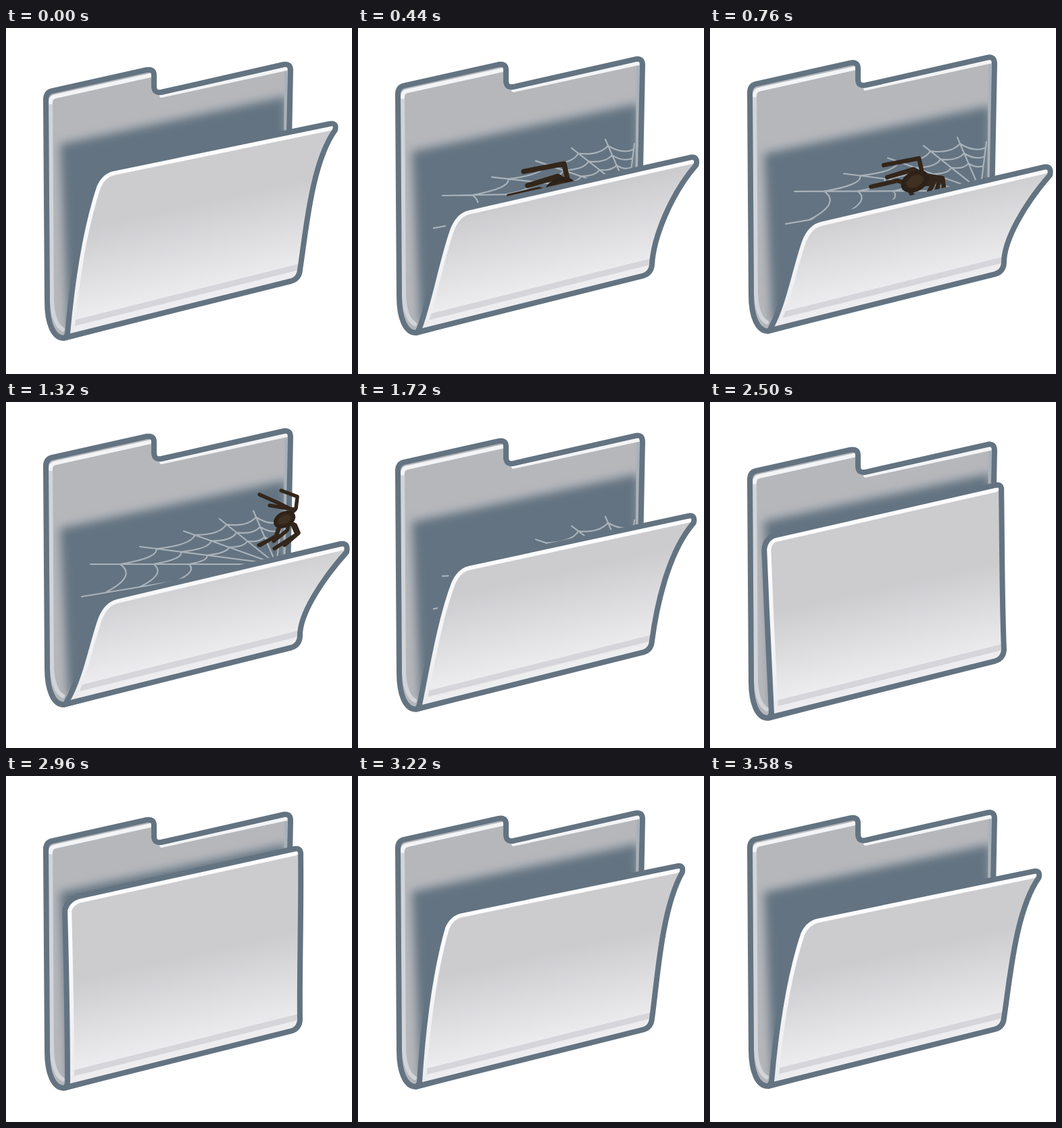
Write an HTML page that moves like this. It is 512 by 512 pixels and loops after 3.6 s.

```html
<!DOCTYPE html>
<html>
<head>
<meta charset="utf-8">
<style>
html, body { margin: 0; width: 100%; height: 100%; overflow: hidden; background: #fff; }
svg { display: block; width: 100vw; height: 100vh; }
path, line, ellipse { stroke-linecap: round; stroke-linejoin: round; }
.edge { fill: none; stroke: #637381; stroke-width: 8; }
.light { fill: none; stroke: #f3f4f6; stroke-width: 6; }
</style>
</head>
<body>
<svg id="stage" viewBox="0 0 512 512">
  <defs>
    <linearGradient id="sheet" gradientUnits="userSpaceOnUse" x1="240" y1="270" x2="270" y2="405">
      <stop offset="0" stop-color="#cccccf"/>
      <stop offset="1" stop-color="#efeff1"/>
    </linearGradient>
    <linearGradient id="rim" gradientUnits="userSpaceOnUse" x1="0" y1="220" x2="0" y2="450">
      <stop offset="0" stop-color="#fdfdfe"/>
      <stop offset="1" stop-color="#ebebee"/>
    </linearGradient>
    <filter id="soft" filterUnits="userSpaceOnUse" x="0" y="0" width="512" height="512">
      <feGaussianBlur stdDeviation="7"/>
    </filter>
    <clipPath id="inBack"><path class="backShape"/></clipPath>
    <clipPath id="inFront"><path class="frontShape"/></clipPath>
  </defs>
  <g id="back" class="folder">
    <path class="backShape" fill="#b5b7bb"/>
    <g clip-path="url(#inBack)">
      <path id="shade" fill="#637381" filter="url(#soft)"/>
      <path class="light" d="M66 108L68 405Q70 438 84 446" style="stroke:#d1d4d8"/>
      <path class="light" d="M414 66L411 400" style="stroke:#a9b2ba;stroke-width:4"/>
      <path class="light" d="M66 110Q66 102 74 101L214 70M230 100L415 60"/>
    </g>
    <path id="web" fill="none" stroke="#a9b2ba" stroke-width="2.2"/>
    <path class="edge backShape"/>
  </g>
  <g id="spider">
    <path id="legs" fill="none" stroke="#33261a"/>
    <g id="body">
      <ellipse rx="22" ry="15" fill="#2e2117"/>
      <ellipse rx="14" ry="9" fill="#3f3021" stroke="#33261a" stroke-width="2"/>
    </g>
  </g>
  <g id="front" class="folder">
    <path class="frontShape" fill="url(#sheet)"/>
    <g clip-path="url(#inFront)">
      <path d="M92 439L440 352" stroke="#d5d5da" stroke-width="9"/>
      <path d="M92 448L440 361" stroke="#ededf0" stroke-width="9"/>
      <path id="glow" fill="none" stroke="url(#rim)" stroke-width="20"/>
    </g>
    <path class="edge frontShape"/>
  </g>
</svg>
<script>
const LOOP = 3600;
const $ = id => document.getElementById(id);
const all = sel => document.querySelectorAll(sel);
const mix = (a, b, k) => a + (b - a) * k;
const hermite = (a, b, ma, mb, k) => {
  const k2 = k * k, k3 = k2 * k;
  return a * (2 * k3 - 3 * k2 + 1) + ma * (k3 - 2 * k2 + k) + b * (3 * k2 - 2 * k3) + mb * (k3 - k2);
};

// How far the folder is open over time: 0 shut, 3 wide open
const opening = [
  [0, 2], [440, 2.74], [760, 2.94], [1080, 3], [1400, 3], [1640, 2.75], [2020, 0.4],
  [2160, 0.1], [2400, 0], [2700, 0.25], [2960, 1], [3240, 1.85], [LOOP, 2]
];
const slopes = opening.slice(1).map(([t, v], i) => (v - opening[i][1]) / (t - opening[i][0]));
const tangent = i => {
  const n = slopes.length, a = slopes[(i + n - 1) % n], b = slopes[i % n];
  return a * b > 0 ? 2 * a * b / (a + b) : 0;
};
function openness(t) {
  const i = opening.findIndex(k => k[0] > t) - 1;
  const [t0, a] = opening[i], [t1, b] = opening[i + 1], d = t1 - t0;
  return hermite(a, b, tangent(i) * d, tangent(i + 1) * d, (t - t0) / d);
}

// Folder shift, shade shift, then the points of the front sheet
const poses = [
  [9, -4, 432, 290, 432, 200, 431, 123, 432, 112, 421, 115, 100, 188, 82, 191, 80, 210, 83, 290, 88, 390],
  [3, -3, 434, 290, 437, 200, 436, 115, 437, 102, 426, 105, 112, 174, 91, 178, 87, 196, 89, 270, 91, 380],
  [0, 0, 444, 300, 452, 200, 487, 151, 490, 139, 478, 142, 158, 208, 140, 212, 131, 232, 108, 300, 97, 385],
  [-11, 26, 434, 326, 466, 276, 504, 233, 507, 219, 495, 221, 163, 299, 143, 304, 133, 329, 121, 361, 110, 421]
];
function poseAt(q) {
  const i = Math.min(2, Math.floor(q));
  const m = (j, n) => j === 0 ? poses[1][n] - poses[0][n]
    : j === 3 ? poses[3][n] - poses[2][n]
    : (poses[j + 1][n] - poses[j - 1][n]) / 2;
  return poses[i].map((a, n) => hermite(a, poses[i + 1][n], m(i, n), m(i + 1, n), q - i));
}

const backPath = 'M86 459C70 459 61 437 61 405L59 106Q59 95 69 93L208 62Q219 60 219 70V86' +
  'Q219 97 230 95L411 54Q421 52 421 63L415 372Z';
all('.backShape').forEach(p => p.setAttribute('d', backPath));

function webPath() {
  const hub = [400, 251];
  const ends = [[112, 299], [125, 251], [198, 225], [263, 202], [316, 184], [366, 172], [409, 179]];
  const toHub = (p, f) => [mix(p[0], hub[0], f), mix(p[1], hub[1], f)];
  let d = ends.map(p => `M${p}L${hub}`).join('');
  for (const f of [0.12, 0.3, 0.49]) {
    const knots = ends.map((p, i) => toHub(p, f + (i === 1 ? 0.04 : 0)));
    d += 'M' + knots[0];
    knots.slice(1).forEach((p, i) => {
      const o = knots[i];
      d += `Q${toHub([(o[0] + p[0]) / 2, (o[1] + p[1]) / 2], 0.15)} ${p}`;
    });
  }
  return d;
}
$('web').setAttribute('d', webPath());

// Legs as tip, knee and root, measured from the body
const crouch = [
  [-46, -24, 6, -34, 10, -16], [-41, -6, -2, -18, 8, -12], [-38, -7, -2, -17, 8, -12],
  [-65, 8, -26, -1, -16, 2], [43, 10, 41, -5, 20, -8], [33, 12, 36, -2, 16, -4],
  [21, 15, 28, 2, 14, 4], [-3, 21, -6, 17, -8, 10]
];
const climb = [
  [-5, -43, 19, -34, 17, -17], [-37, -37, -10, -25, 12, -14], [-22, -21, 8, -16, 16, -15],
  [-38, 38, -13, 25, -8, 10], [0, 38, 21, 20, 16, 8], [-15, 43, 18, 22, 12, 8],
  [-16, 32, 4, 16, 6, 8], [-36, 38, -12, 24, -6, 8]
];
const route = [
  [0, 296, 250, 1.2], [300, 296, 246, 1.2], [440, 298, 240, 1.15], [760, 303, 227, 1],
  [1320, 412, 174, 1], [1460, 432, 166, 0.9], [1600, 395, 185, 0.7]
];

function drawSpider(t) {
  const i = route.findIndex(r => r[0] > t) - 1;
  $('spider').style.display = i < 0 ? 'none' : '';
  if (i < 0) return;
  const k = (t - route[i][0]) / (route[i + 1][0] - route[i][0]);
  const [, x, y, s] = route[i].map((a, n) => mix(a, route[i + 1][n], k));
  const turn = Math.min(1, Math.max(0, (t - 760) / 560));
  const stride = 4 * Math.sin(Math.PI * turn);
  let d = '';
  crouch.forEach((leg, j) => {
    const p = leg.map((a, n) => mix(a, climb[j][n], turn));
    p[0] += stride * Math.sin(t / 35 + j * 2);
    p[1] += stride * Math.cos(t / 35 + j * 2);
    d += `M${p[0]} ${p[1]}L${p[2]} ${p[3]}L${p[4]} ${p[5]}L0 0`;
  });
  $('legs').setAttribute('d', d);
  $('legs').setAttribute('stroke-width', mix(6.5, 5.5, turn));
  $('body').setAttribute('transform', `rotate(-28) scale(${mix(1, 0.78, turn)})`);
  $('spider').setAttribute('transform', `translate(${x} ${y}) scale(${s})`);
  $('stage').insertBefore($('spider'), t < 1460 ? $('front') : $('back'));
}

function draw(t) {
  const q = openness(t);
  const [dy, sh, ...p] = poseAt(q);
  const at = n => `${p[n * 2].toFixed(2)} ${p[n * 2 + 1].toFixed(2)}`;
  const rim = `${at(4)}L${at(5)}Q${at(6)} ${at(7)}C${at(8)} ${at(9)} 91 452`;
  const sheet = `M88 458L422 374.5Q434 371 435 358C${at(0)} ${at(1)} ${at(2)}Q${at(3)} ${rim}Z`;
  all('.frontShape').forEach(e => e.setAttribute('d', sheet));
  $('glow').setAttribute('d', 'M' + rim);
  $('shade').setAttribute('d', `M80 ${172 + sh}L415 ${101 + sh}V470L92 445Z`);
  const k = 0.067 * (3 - q);
  $('web').setAttribute('transform', `matrix(1 ${-k} 0 1 0 ${409 * k})`);
  all('.folder').forEach(g => g.setAttribute('transform', `translate(0 ${dy})`));
  drawSpider(t);
}

const start = performance.now();
function tick() {
  draw((performance.now() - start) % LOOP);
  requestAnimationFrame(tick);
}
tick();
</script>
</body>
</html>
```
